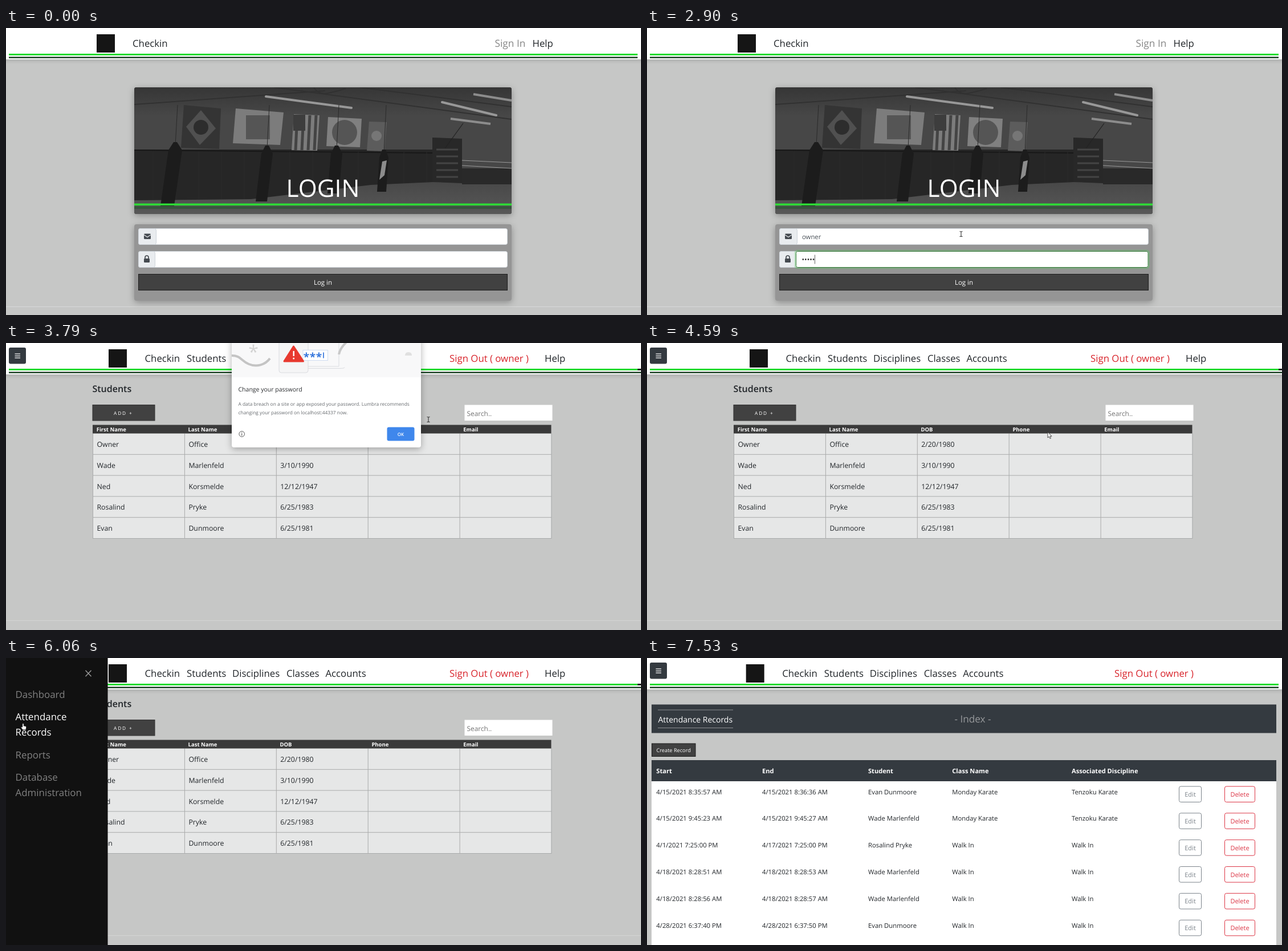
Recreate the animation shown at these times as an HTML page. Size 1114 by 503 pixels, loop 7.99 s.

```html
<!DOCTYPE html>
<html lang="en">
<head>
<meta charset="utf-8">
<title>Checkin</title>
<style>
html, body { margin: 0; width: 100%; height: 100%; overflow: hidden; background: #c6c7c6; }
#stage { display: block; width: 100vw; height: 100vh; }
text { font-family: "Open Sans", "Noto Sans", sans-serif; text-rendering: geometricPrecision; white-space: pre; }
.raised { filter: drop-shadow(0 3px 6px rgba(0, 0, 0, .3)); }
</style>
</head>
<body>
<svg id="stage" viewBox="0 0 1114 503"></svg>
<script>
const LOOP = 7990, STEP = 80;
const USER = 'owner';
const INK = '#212529', SLATE = '#343a40', GREEN = '#26dc32', BUTTON = '#414141';

// ---- drawing helpers: each returns SVG markup ----
const text = (x, y, size, fill, str, extra = '') =>
  `<text x="${x}" y="${y}" font-size="${size}" fill="${fill}" ${extra}>${str}</text>`;
const rect = (x, y, w, h, fill, extra = '') =>
  `<rect x="${x}" y="${y}" width="${w}" height="${h}" fill="${fill}" ${extra}/>`;
const line = (d, stroke, width = 1, extra = '') =>
  `<path d="${d}" fill="none" stroke="${stroke}" stroke-width="${width}" ${extra}/>`;
const poly = (points, fill, extra = '') => `<polygon points="${points}" fill="${fill}" ${extra}/>`;
const circle = (x, y, r, fill, extra = '') => `<circle cx="${x}" cy="${y}" r="${r}" fill="${fill}" ${extra}/>`;
const group = (id, body, extra = '') => `<g id="${id}" ${extra}>${body}</g>`;
const range = (n, fn) => Array.from({ length: n }, (_, i) => fn(i)).join('');
const MID = ' text-anchor="middle"', BOLD = ' font-weight="700"', SEMI = ' font-weight="600"';

// ---- navigation bar ----
const bar = (logoX, right) =>
  rect(0, 55, 1114, 8, 'url(#fall)') + rect(0, 0, 1114, 55, '#fff') +
  rect(5, 45, 1103, 3, GREEN) + rect(5, 50.4, right - 5, 2.6, '#24482c') +
  rect(logoX - 16, 11, 32, 32, '#151515');

const navText = (x, str, fill = INK, size = 16.8) => text(x, 33, size, fill, str);

const memberBar = (shift, signX, right) => bar(196 + shift, right) +
  rect(5, 8, 30, 28.5, SLATE, 'rx="3"') + line('M15.5 19.2h9.5M15.5 22.7h9.5M15.5 26.2h9.5', '#fff', 1.2) +
  [[243.5, 'Checkin'], [317, 'Students'], [397, 'Disciplines'], [492, 'Classes'], [560.5, 'Accounts']]
    .map(([x, s]) => navText(x + shift, s)).join('') +
  navText(signX, `Sign Out ( ${USER} )`, '#d8232a');

// ---- login page ----
const bag = (x, top, bottom, lean, w) =>
  line(`M${x + 4} 135L${x} ${top}`, '#2a2a2a', 1) +
  poly(`${x - 3},${top - 6} ${x + 3},${top - 6} ${x + w},${top + 8} ${x + w - lean},${bottom} ${x - w - lean},${bottom} ${x - w},${top + 8}`, '#1c1c1c');

const photo =
  rect(225, 104, 662, 222, '#474747') + rect(225, 104, 662, 50, 'url(#ceiling)') +
  line('M225 134L560 110M470 104L887 160M620 104L887 138M540 104q8 14 26 10t30-8', '#313131', 2) +
  line('M456 120L606 140M765 130L860 153', '#989898', 4, 'stroke-linecap="round"') +
  line('M820 116L887 127M780 159L850 168', '#8c8c8c', 4) +
  rect(225, 213, 525, 90, '#262626') + line('M225 214L750 219', '#181818', 2) +
  range(13, i => line(`M${258 + i * 40} 217V300`, '#2b2b2b')) +
  poly('225,302 430,300 640,275 750,270 887,273 887,326 225,326', 'url(#floor)') +
  poly('748,192 800,194 800,272 748,270', '#282828') + rect(800, 246, 87, 28, '#292929') +
  range(5, i => line(`M755 ${213 + i * 12}h38`, '#444', 3)) +
  line('M800 232L887 236M800 241L887 246', '#999', 1.2) + line('M802 167L770 211', '#222', 1.2) +
  poly('312,135 377,141 374,212 307,210', '#343434') + poly('342,144 368,176 340,205 316,173', '#505050') +
  circle(342, 174, 13, '#2d2d2d') +
  poly('403,141 487,148 481,205 398,202', '#7c7c7c') + rect(421, 153, 42, 42, '#555') +
  poly('505,151 550,153 546,215 501,214', '#7c7c7c') +
  range(4, i => line(`M${511 + i * 11} 153l-3 61`, '#444', 5)) + rect(504, 152, 21, 28, '#3d3d3d') +
  poly('565,156 624,159 621,209 562,207', '#808080') + circle(594, 183, 22, '#555') +
  poly('637,164 668,165 664,216 633,215', '#5c5c5c') + circle(650, 189, 9, '#767676') +
  bag(297, 206, 312, 14, 12) + bag(458, 212, 304, 10, 10) + bag(580, 212, 290, 6, 10) + bag(663, 219, 287, 4, 8) +
  poly('660,234 668,232 664,258 655,266', '#8c8c8c') +
  rect(225, 307.5, 662, 3.6, '#2edb36') + rect(225, 312.5, 662, 4.5, '#2f5637', 'opacity=".75"') +
  text(556, 296, 42.4, '#fff', 'LOGIN', MID);

const field = (y, split, id) =>
  rect(232.5, y + .5, 647, 28, '#fff', 'rx="3" stroke="#ced4da"') +
  rect(232.5, y + .5, split - 232, 28, '#e9ecef', 'rx="3" stroke="#ced4da"') +
  group(id,
    rect(split - 1, y - 1, 881.5 - split, 31, 'none', 'rx="4" stroke="#50c858" stroke-opacity=".3" stroke-width="3"') +
    rect(split + .5, y + .5, 878.5 - split, 28, '#fff', 'rx="3" stroke="#347838"'));

const login = bar(175, 1108) + navText(222, 'Checkin') + navText(857.5, 'Sign In', '#868686', 17.3) + navText(923.5, 'Help') +
  rect(0, 488, 1114, 1, '#d8d9d9') +
  rect(225, 104, 662, 222, '#444', 'rx="4" class="raised"') + group('photo', photo, 'clip-path="url(#frame)"') +
  rect(225, 344, 662, 134, '#959595', 'rx="4" class="raised"') +
  field(351, 263, 'mailGlow') + field(391, 261, 'passGlow') +
  rect(242, 360.5, 12, 9.5, '#454a50', 'rx="1.5"') + line('M242 362.5l6 4 6-4', '#e9ecef', 1.1) +
  rect(242, 404, 10, 7, '#454a50', 'rx="1.3"') + line('M244 404v-2a3 3 0 0 1 6 0v2', '#454a50', 1.7) +
  rect(232.5, 431.5, 647, 28, BUTTON, 'stroke="#1d1d1d"') + text(556, 450, 11.5, '#fff', 'Log in', MID) +
  text(272, 370, 11.3, '#495057', '', 'id="mail"') + text(271.5, 410, 12.2, '#333', '', 'id="pass"') +
  rect(0, 0, 1, 16, '#666', 'id="caret"');

// ---- students page ----
const people = [
  ['Owner', 'Office', '2/20/1980'], ['Wade', 'Marlenfeld', '3/10/1990'], ['Ned', 'Korsmelde', '12/12/1947'],
  ['Rosalind', 'Pryke', '6/25/1983'], ['Evan', 'Dunmoore', '6/25/1981']];
const colX = i => 152.5 + i * 160.9, rowY = i => 158.5 + i * 36.8;

const students = rect(0, 486, 1114, 1, '#d4d5d5') + memberBar(0, 778, 1114) + navText(945, 'Help') +
  rect(1108, 45, 6, 3, '#222') +
  text(151.5, 86, 16, INK, 'Students', SEMI) +
  rect(152, 108.5, 109, 27.5, BUTTON, 'stroke="#333"') +
  text(189, 125.7, 8.3, '#fff', 'ADD +', 'letter-spacing="1.9"') +
  rect(804.5, 108.5, 154, 27.5, '#fff') + text(808.5, 127.5, 11.9, '#757575', 'Search..') +
  rect(152.5, 158.5, 804, 184, '#e6e7e7') +
  line(range(6, i => `M${colX(i)} 158.5v184`) + range(5, i => `M152 ${rowY(i + 1)}h805`), '#a9abab') +
  rect(152, 143.5, 804.5, 15, '#3a3a3a') +
  ['First Name', 'Last Name', 'DOB', 'Phone', 'Email']
    .map((s, i) => text(colX(i) + 6.2, 155, 9.5, '#fff', s, BOLD)).join('') +
  people.map((p, r) => p.map((s, c) => text(colX(c) + 7, rowY(r) + 23.5, 12.3, INK, s)).join('')).join('');

const dialog = rect(396, -10, 332, 193, '#fff', 'rx="4" class="raised"') + rect(396, 0, 332, 60, '#f8f8f9') +
  line('M396 22C412 22 412 31 426 37S455 38 463 27', '#c4c4c4', 4) +
  text(434, 27, 32, '#d2d2d2', '*', MID) +
  rect(479, -10, 51, 62, '#f5f5f6', 'rx="4" stroke="#dadce0"') +
  line('M530 41h54V-2M530 44.5h56q8 0 8-2', '#dadce0') + line('M584 20Q586 8 600 -4', '#c9c9c9', 4) +
  rect(521, 12.5, 43.5, 18, '#fff', 'stroke="#cfdcf0"') +
  range(3, i => text(527 + i * 11, 31, 19, '#3576dc', '*', MID + BOLD)) + line('M557 16.5v10', '#3576dc', 1.7) +
  poly('504.5,6 488,32 521.5,32', '#e8392f', 'stroke="#e8392f" stroke-width="3" stroke-linejoin="round"') +
  rect(503.5, 14, 2.4, 9, '#fff') + circle(504.7, 27, 1.5, '#fff') +
  `<path d="M700 22q0-6 6-6t6 6z" fill="#e0e0e0"/>` +
  text(407.5, 84.7, 10.5, '#2a2c2f', 'Change your password') +
  text(407.5, 110.3, 8.4, '#666a6e', 'A data breach on a site or app exposed your password. Lumbra recommends') +
  text(407.5, 125.3, 8.4, '#666a6e', 'changing your password on localhost:44337 now.') +
  circle(413.7, 159.5, 4.8, 'none', 'stroke="#555"') + line('M413.7 158.5v4M413.7 156.5v1.2', '#555', 1.1) +
  rect(668.5, 147.5, 48, 24, '#3f87ec', 'rx="3"') + text(692.5, 162.5, 8, '#fff', 'OK', MID + SEMI);

const sideText = (y, str) => text(16.5, y, 16.9, '#818181', str);
const side = rect(0, 0, 179, 503, '#111') +
  group('close', line('M-5 21.8l10 10.4M5 21.8l-10 10.4', '#9a9a9a', 1.4)) +
  sideText(70, 'Dashboard') + group('hover', sideText(109, 'Attendance') + sideText(136.3, 'Records')) +
  sideText(175.5, 'Reports') + sideText(214.7, 'Database') + sideText(242, 'Administration');

// ---- attendance records page ----
const karate = ['Monday Karate', 'Tenzoku Karate'], walkIn = ['Walk In', 'Walk In'];
const records = [
  ['4/15/2021 8:35:57 AM', '4/15/2021 8:36:36 AM', 'Evan Dunmoore', ...karate],
  ['4/15/2021 9:45:23 AM', '4/15/2021 9:45:27 AM', 'Wade Marlenfeld', ...karate],
  ['4/1/2021 7:25:00 PM', '4/17/2021 7:25:00 PM', 'Rosalind Pryke', ...walkIn],
  ['4/18/2021 8:28:51 AM', '4/18/2021 8:28:53 AM', 'Wade Marlenfeld', ...walkIn],
  ['4/18/2021 8:28:56 AM', '4/18/2021 8:28:57 AM', 'Wade Marlenfeld', ...walkIn],
  ['4/28/2021 6:37:40 PM', '4/28/2021 6:37:50 PM', 'Evan Dunmoore', ...walkIn]];
const recordX = [16.3, 202, 388, 535.3, 745];

const outlined = (x, y, w, color, str) =>
  rect(x + .5, y, w, 27.5, '#fff', `rx="3" stroke="${color}"`) + text(x + w / 2 + .5, y + 18, 11, color, str, MID);

const attendance = memberBar(-6.3, 820, 1108) +
  rect(8, 81.5, 1096, 50, SLATE) + line('M19 91h132M19 122.5h132', '#8d9093') +
  text(19.5, 112.5, 14, '#fff', 'Attendance Records') + text(571.5, 113, 17.2, '#97999b', '- Index -', MID) +
  rect(8.5, 150, 76.5, 22.5, BUTTON, 'stroke="#1d1d1d"') + text(46.7, 165, 9.2, '#fff', 'Create Record', MID) +
  rect(8, 179, 1096, 37, SLATE) + rect(8, 216, 1096, 287, '#fff') +
  ['Start', 'End', 'Student', 'Class Name', 'Associated Discipline']
    .map((s, i) => text(recordX[i], 201.7, 11.1, '#fff', s, BOLD)).join('') +
  records.map((row, r) => {
    const y = r * 46.85;
    return row.map((s, c) => text(recordX[c], 238.5 + y, 11.3, INK, s)).join('') +
      outlined(933, 225 + y, 39, '#7b838a', 'Edit') + outlined(1013, 225 + y, 53, '#dc3545', 'Delete');
  }).join('');

// ---- pointer shapes, hot spot at 0,0 ----
const shapes = {
  arrow: '<path d="M0 0V10L2.3 8 4 11.5 5.6 10.8 4.1 7.4H7z" fill="#fff" stroke="#222" stroke-width=".8"/>',
  beam: line('M-2.5 -4.5Q0 -4.5 0 -3.5Q0 -4.5 2.5 -4.5M0 -4V4M-2.5 4.5Q0 4.5 0 3.5Q0 4.5 2.5 4.5', '#333', 1.1),
  hand: '<path d="M-1.2 6V.5Q0 -1.2 1.2 .5V4Q5.6 4 5.6 6.5L4.8 11H-.5L-3.5 7Q-3.5 5-1.2 6z" fill="#fff" stroke="#222" stroke-width=".8"/>'
};

const stage = document.getElementById('stage');
const shade = (id, a, b) =>
  `<linearGradient id="${id}" x2="0" y2="1"><stop stop-color="${a}"/><stop offset="1" stop-color="${b}"/></linearGradient>`;
stage.innerHTML = '<defs>' + shade('fall', 'rgba(0,0,0,.1)', 'rgba(0,0,0,0)') + shade('ceiling', '#363636', '#474747') +
  shade('floor', '#484848', '#585858') + `<clipPath id="frame">${rect(225, 104, 662, 222, '#000', 'rx="4"')}</clipPath></defs>` +
  rect(0, 0, 1114, 503, '#c6c7c6') +
  group('login', login) + group('students', students + group('dialog', dialog) + `<svg id="side" height="503">${side}</svg>`) +
  group('attendance', attendance) +
  group('pointer', Object.keys(shapes).map(k => group(k, shapes[k])).join(''));

const el = {};
stage.querySelectorAll('[id]').forEach(e => el[e.id] = e);
const show = (id, on) => el[id].style.display = on ? '' : 'none';
const ramp = (t, a, b) => Math.min(1, Math.max(0, (t - a) / (b - a)));
const count = (t, times) => times.filter(x => t >= x).length;

// time, x, y, shape
const track = [
  [0, -50, -50, 'arrow'], [129, -50, -50, 'arrow'], [130, 894, 458, 'arrow'], [280, 557, 371, 'beam'],
  [589, 557, 371, 'beam'], [590, 551, 361, 'beam'], [3550, 551, 361, 'beam'], [3790, 741, 134, 'beam'],
  [3870, 741, 134, 'arrow'], [4350, 695, 161, 'arrow'], [4430, 695, 161, 'arrow'], [4590, 703, 156, 'arrow'],
  [4820, 36, 24, 'arrow'], [5050, 36, 24, 'arrow'], [5130, 24, 24, 'hand'], [5660, 24, 24, 'hand'],
  [5980, 30, 115, 'hand'], [6379, 30, 115, 'hand'], [6380, 28, 106, 'arrow'], [6590, 28, 106, 'arrow'],
  [6840, 543.5, 146, 'arrow'], [7370, 543.5, 146, 'arrow'], [7450, 957, 150, 'arrow'], [7529, 957, 150, 'arrow'],
  [7530, -50, -50, 'arrow'], [LOOP, -50, -50, 'arrow']];

function movePointer(t) {
  const i = track.findIndex((k, n) => t < track[n + 1][0]);
  const a = track[i], b = track[i + 1];
  const u = Math.floor((t - a[0]) / STEP) * STEP / (b[0] - a[0]);
  const at = n => a[n] + (b[n] - a[n]) * u;
  el.pointer.setAttribute('transform', `translate(${at(1)} ${at(2)})`);
  Object.keys(shapes).forEach(k => show(k, k === a[3]));
}

function typeLogin(t) {
  const swap = ramp(t, 1620, 1770);
  el.mailGlow.style.opacity = ramp(t, 700, 910) * (1 - swap);
  el.passGlow.style.opacity = swap;
  el.mail.textContent = USER.slice(0, count(t, [1060, 1140, 1220, 1370, 1460]));
  el.pass.textContent = '•'.repeat(count(t, [2160, 2240, 2320, 2550, 2550]));
  const input = t < 1620 ? el.mail : el.pass;
  const x = +input.getAttribute('x') + (input.textContent ? input.getComputedTextLength() : -1);
  el.caret.setAttribute('x', Math.round(x));
  el.caret.setAttribute('y', t < 1620 ? 357.5 : 397.5);
  show('caret', t >= 740);
}

function draw(t) {
  show('login', t < 2940);
  show('students', t >= 2940 && t < 6380);
  show('attendance', t >= 6380);
  if (t < 2940) typeLogin(t);
  el.dialog.style.opacity = ramp(t, 3300, 3470) * (1 - ramp(t, 4380, 4540));
  const open = 1 - (1 - ramp(t, 5180, 5680)) ** 2.5;
  const width = 178.5 * open;
  el.side.setAttribute('width', width);
  show('side', width > 0);
  el.close.setAttribute('transform', `translate(${width - 34} 0)`);
  const lit = 129 + 126 * ramp(t, 5920, 6060);
  el.hover.querySelectorAll('text').forEach(e => e.setAttribute('fill', `rgb(${lit},${lit},${lit})`));
  movePointer(t);
}

const start = performance.now();
(function tick() {
  draw((performance.now() - start) % LOOP);
  requestAnimationFrame(tick);
})();
</script>
</body>
</html>
```
